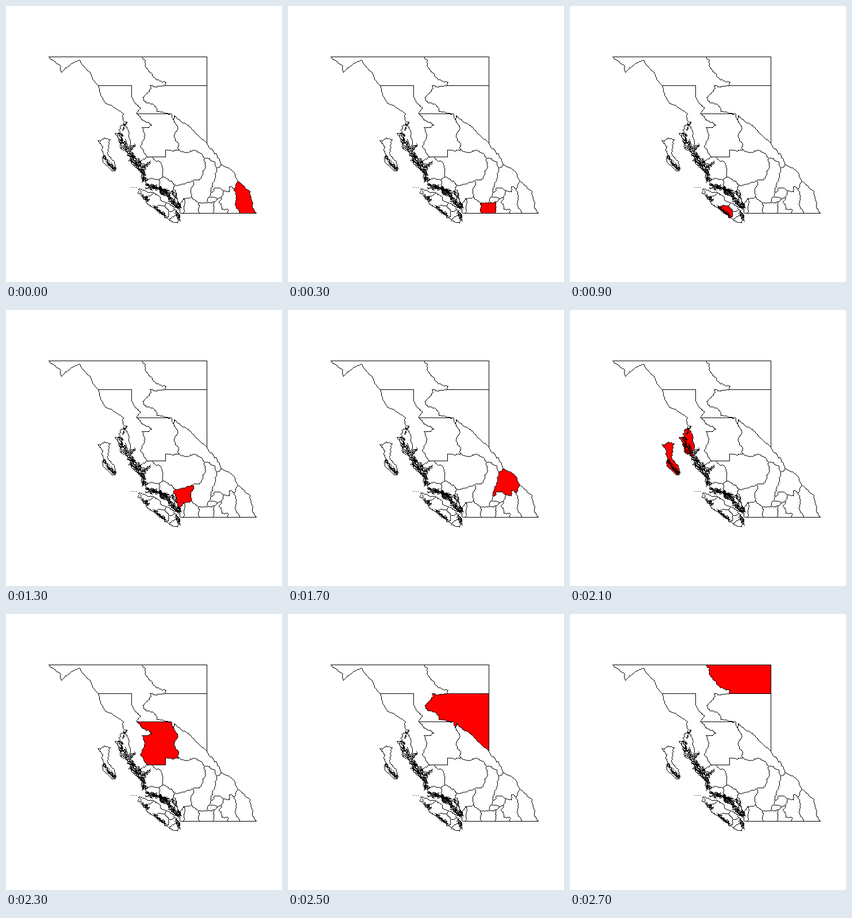
These frames come from a looping animation (480x480 px, 2800 ms). A matplotlib script:

```python
import numpy as np
import matplotlib.pyplot as plt
from matplotlib.animation import FuncAnimation

SIZE, DPI = 480, 100
RED, BLACK = (255, 0, 0), (0, 0, 0)
rng = np.random.default_rng(12)
borders = np.zeros((SIZE, SIZE), bool)
inlets = np.zeros((SIZE, SIZE), bool)


def plot(mask, pts):
    """Set a one-pixel line through the rounded points."""
    pts = np.rint(pts).astype(int)
    for a, b in zip(pts, pts[1:]):
        n = np.abs(b - a).max() + 1
        x, y = np.rint(np.linspace(a, b, n)).astype(int).T
        mask[y, x] = True


def roughen(a, b, amount):
    """Split a segment at displaced midpoints; the end point is left out."""
    d = b - a
    length = np.hypot(*d)
    if length < 2.4:
        return [a]
    shift = np.clip(rng.normal(0, amount), -0.4, 0.4) * length ** -0.3
    mid = (a + b) / 2 + shift * np.array([-d[1], d[0]])
    return roughen(a, mid, amount) + roughen(mid, b, amount)


def border(*xy, rough=0.22):
    pts = np.array(xy, float).reshape(-1, 2)
    line = []
    for a, b in zip(pts, pts[1:]):
        line += roughen(a, b, rough)
    plot(borders, line + [pts[-1]])


def straight(*xy):
    plot(borders, np.array(xy).reshape(-1, 2))


def coast(*xy):
    border(*xy, rough=0.32)


def scatter_inlets(x0, y0, x1, y1, spread, count, steps=4):
    """Jagged strokes scattered along a stretch of broken coast."""
    a, d = np.array([x0, y0]), np.array([x1 - x0, y1 - y0])
    normal = np.array([-d[1], d[0]]) / np.hypot(*d)
    for _ in range(count):
        start = a + d * rng.random() + normal * rng.uniform(-spread, spread)
        angle = np.arctan2(d[1], d[0]) + rng.normal(0, 0.8, steps)
        move = np.column_stack([np.cos(angle), np.sin(angle)])
        walk = np.cumsum(move * rng.uniform(1, 2.8, (steps, 1)), axis=0)
        plot(inlets, np.vstack([start, start + walk]) - walk[-1] / 2)


# Surveyed lines
straight(74, 88, 349, 88, 349, 238)
straight(160, 138, 218, 138, 218, 157)
straight(277, 138, 349, 138)
straight(227, 187, 285, 187)
straight(248, 211, 236, 211)
straight(249, 262, 277, 262, 277, 250)
straight(304, 360, 435, 360)

# Outer edges
border(74, 88, 95, 105, 96, 115, 114, 99, 127, 94, 146, 115, 160, 138,
       172, 168, 190, 178, 204, 187, 203, 195, 204, 206, rough=0.12)
border(291, 198, 293, 190, 302, 199, 319, 210, 332, 223, 349, 238, 355, 248,
       366, 258, 374, 275, 382, 280, 398, 292, 403, 304, 422, 320, 428, 345,
       435, 360, rough=0.16)

# Northern inner borders
border(237, 88, 247, 111, 255, 122, 278, 132, 277, 138)
border(277, 138, 262, 141, 250, 138, 249, 148, 238, 158, 243, 168, 257, 172,
       262, 183, 274, 184, 285, 187, 291, 198)
border(218, 157, 222, 165, 233, 176, 227, 187, 234, 195, 247, 201, 253, 207,
       248, 211)
border(236, 211, 240, 230, 233, 244, 241, 257, 249, 262)
border(277, 250, 302, 251, 314, 255, 327, 250, 345, 264, 363, 271, 366, 281,
       374, 275)
border(291, 198, 299, 212, 292, 227, 302, 251)

# Southern inner borders
border(345, 264, 347, 272, 342, 291, 339, 299, 323, 304, 305, 309, 293, 311,
       283, 303, 272, 296, 271, 280, 267, 270, 254, 262)
border(323, 304, 326, 311, 321, 324, 323, 332, 334, 342, 336, 360)
border(323, 332, 309, 334, 309, 347, 308, 360)
border(403, 304, 397, 317, 400, 330, 399, 346, 406, 360)
border(397, 317, 388, 314, 388, 323, 378, 321, 374, 331, 375, 353, 386, 354,
       386, 360)
border(374, 331, 368, 335, 361, 340, 361, 352, 358, 360)
border(361, 340, 348, 341, 334, 342)
border(368, 335, 354, 331, 348, 341)
border(354, 331, 356, 324, 362, 316, 372, 316, 378, 321)
border(356, 324, 364, 297, 366, 281)
border(309, 334, 301, 345, 296, 328, 291, 318, 293, 311)
border(272, 296, 266, 302, 248, 301, 241, 304)
border(266, 302, 266, 317)
border(291, 318, 281, 330)
border(296, 328, 292, 343)
border(249, 262, 234, 270, 226, 280)
border(204, 206, 213, 228, 214, 258)

# Coast and islands
coast(204, 206, 193, 227, 199, 247, 214, 258, 226, 280, 238, 294, 241, 304,
      244, 310, 266, 317, 281, 330, 292, 343, 297, 350, 301, 345, 302, 353,
      304, 360)
coast(230, 318, 258, 325, 279, 342, 293, 354, 300, 363, 298, 377, 283, 371,
      279, 368, 258, 351, 241, 336, 230, 318)
border(258, 325, 247, 330, 241, 336)
border(258, 351, 267, 346, 276, 347, 283, 357, 279, 368)
border(276, 347, 279, 342)
border(283, 357, 293, 354)
border(300, 363, 288, 367, 283, 371)
coast(159, 233, 181, 232, 177, 248, 190, 286, 167, 264, 169, 258, 159, 233)
border(189, 221, 195, 221, 192, 225, 189, 221)

# Broken shores: start, end, half width, number of strokes
for shore in [(196, 222, 212, 254, 4, 36), (210, 200, 202, 216, 1, 6),
              (214, 250, 224, 240, 3, 8), (214, 258, 240, 286, 6, 70),
              (234, 282, 240, 302, 4, 24), (240, 280, 250, 270, 2, 8),
              (244, 312, 284, 324, 4, 70), (272, 322, 302, 350, 4, 60),
              (288, 322, 297, 332, 2, 8), (297, 358, 301, 372, 2, 14),
              (232, 324, 246, 338, 2, 16), (256, 348, 276, 364, 2, 26),
              (168, 260, 188, 284, 2, 30)]:
    scatter_inlets(*shore)
inlets[315, 217:228:3] = True

# One point inside every part of each region, in shading order
SEEDS = [
    [(412, 340)], [(390, 335)], [(368, 348)], [(347, 350)], [(320, 348)],
    [(305, 348)], [(295, 370)], [(288, 361)], [(284, 352)], [(272, 356)],
    [(264, 338), (277, 313)], [(289, 330)], [(296, 340)], [(311, 320)],
    [(340, 316)], [(358, 336)], [(366, 324)], [(382, 298)], [(310, 278)],
    [(243, 326), (256, 307)], [(255, 285)],
    [(204, 232), (169, 240), (192, 223)], [(218, 195)], [(265, 225)],
    [(325, 235)], [(320, 170)], [(200, 110)], [(310, 110)],
]


def flood(seeds):
    """Mark everything enclosed by the borders around the seeds."""
    inside = np.zeros_like(borders)
    stack = list(seeds)
    while stack:
        x, y = stack.pop()
        if not (0 <= x < SIZE and 0 <= y < SIZE):
            continue
        if borders[y, x] or inside[y, x]:
            continue
        inside[y, x] = True
        stack += [(x + 1, y), (x - 1, y), (x, y + 1), (x, y - 1)]
    return inside


regions = [flood(seeds) for seeds in SEEDS]


def paint(i):
    canvas = np.full((SIZE, SIZE, 3), 255, np.uint8)
    canvas[regions[i]] = RED
    canvas[borders | inlets] = BLACK
    return canvas


fig = plt.figure(figsize=(SIZE / DPI, SIZE / DPI), dpi=DPI, facecolor="white")
ax = fig.add_axes([0, 0, 1, 1])
ax.axis("off")
image = ax.imshow(paint(0), interpolation="nearest", aspect="auto")


def update(i):
    image.set_data(paint(i))
    return [image]


anim = FuncAnimation(fig, update, frames=len(regions), interval=100,
                     repeat=True, repeat_delay=0, blit=False)
plt.show()
```
